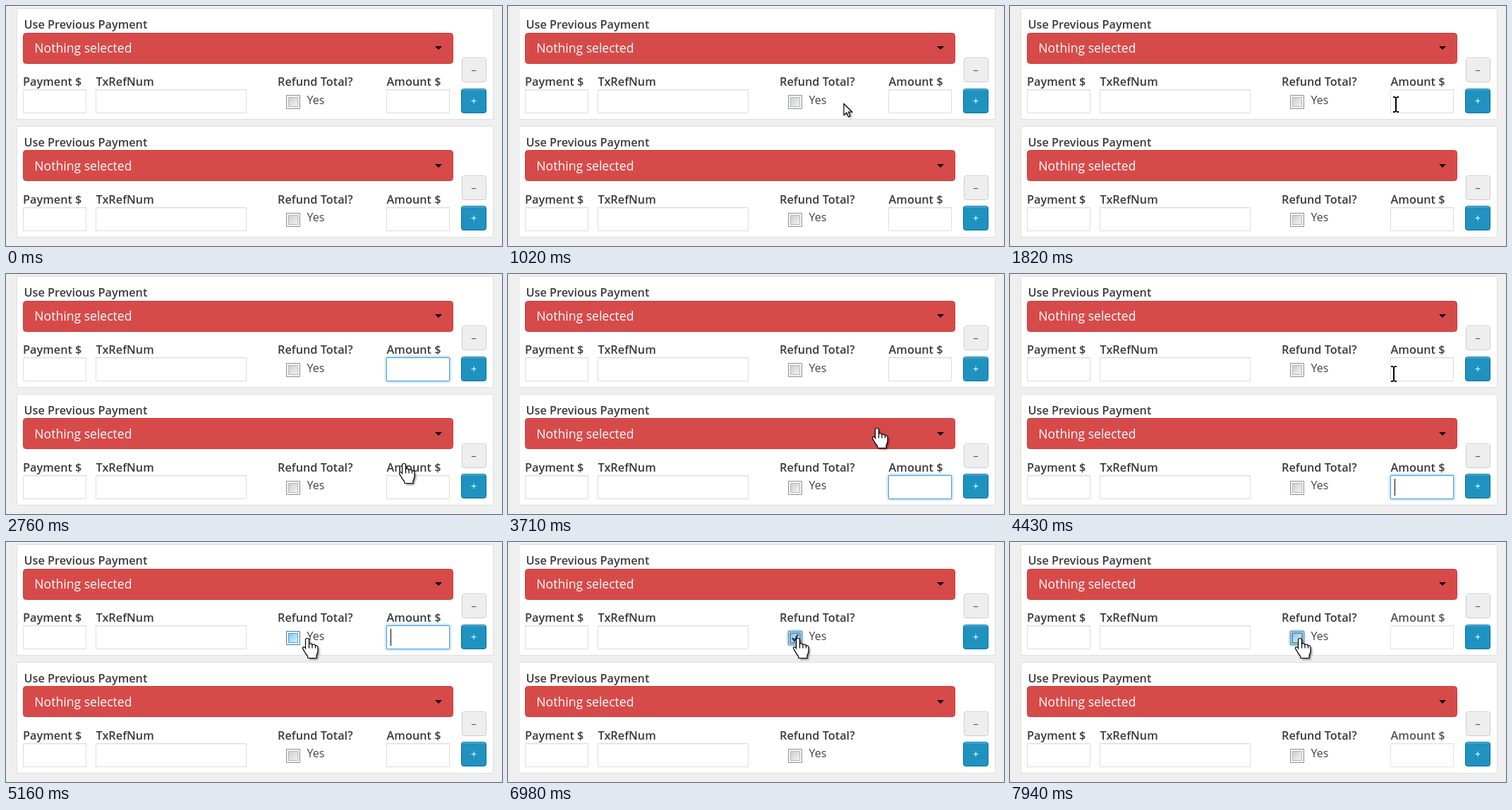
Animation of 703 by 340 pixels, one loop 8000 ms. Source, as an HTML page with a canvas:

```html
<!DOCTYPE html>
<html lang="en">
<head>
<meta charset="utf-8">
<title>Refund form</title>
<style>
html, body { margin: 0; width: 100%; height: 100%; overflow: hidden; background: #efefef; }
canvas { display: block; width: 703px; height: 340px; }
</style>
</head>
<body>
<canvas id="stage"></canvas>
<script>
const W = 703, H = 340, LOOP = 8000, TICK = 60, BLINK = 530, ROW = 167;
const canvas = document.getElementById('stage');
const ctx = canvas.getContext('2d');
const ratio = window.devicePixelRatio || 1;
canvas.width = W * ratio;
canvas.height = H * ratio;

const FONT = '"Open Sans", "Noto Sans", sans-serif';
const LABEL = '600 16.3px ' + FONT;
const INK = '#3a3a3a';

// The pointer glides to each spot in turn, slowing down by the given power
const ENTER = { at: 600, x: 668, y: 146 };
const GLIDES = [
  { at: 600, end: 1440, x: 412, y: 137, power: 2 },
  { at: 1700, end: 1940, x: 560, y: 139, power: 3.5 },
  { at: 2280, end: 2880, x: 565, y: 302, power: 1 },
  { at: 3140, end: 3320, x: 552, y: 302, power: 2 },
  { at: 3590, end: 4430, x: 544, y: 141, power: 4.7, bow: -25 },
  { at: 4800, end: 5340, x: 412, y: 137, power: 2 },
  { at: 6920, end: 6980, x: 411, y: 137, power: 1 }
];

// Clicks on the amount fields alternate between the panels
const CLICKS = [2140, 3140, 4680];
// The checkbox is pressed and released twice
const CHECK = { press: 5740, release: 5800 };
const UNCHECK = { press: 7510, release: 7680 };

const clamp = v => Math.max(0, Math.min(1, v));
const during = (t, { press, release }) => t >= press && t < release;

function pointerAt(t) {
  if (t < ENTER.at) return null;
  let { x, y } = ENTER;
  for (const g of GLIDES) {
    if (t < g.at) break;
    const ticked = Math.floor((t - g.at) / TICK) * TICK;
    const e = 1 - (1 - clamp(ticked / (g.end - g.at))) ** g.power;
    x += (g.x - x) * e + (g.bow || 0) * Math.sin(Math.PI * e);
    y += (g.y - y) * e;
  }
  return { x: Math.round(x), y: Math.round(y) };
}

function amountAlpha(t) {
  return t < UNCHECK.release
    ? 1 - clamp((t - CHECK.release) / 120)
    : clamp((t - UNCHECK.release) / 300);
}

function focusAt(t) {
  const i = CLICKS.filter(c => t >= c).length - 1;
  return i < 0 || t >= CHECK.press ? null : { panel: i % 2, since: CLICKS[i] };
}

const inside = (p, x, y, w, h) => !!p && p.x >= x && p.x < x + w && p.y >= y && p.y < y + h;

function text(str, x, y, font, color, align = 'left') {
  ctx.font = font;
  ctx.fillStyle = color;
  ctx.textAlign = align;
  ctx.fillText(str, x, y);
}

function box(x, y, w, h, fill, stroke, r = 0) {
  ctx.beginPath();
  ctx.roundRect(x + 0.5, y + 0.5, w - 1, h - 1, r);
  ctx.fillStyle = fill;
  ctx.fill();
  ctx.strokeStyle = stroke;
  ctx.lineWidth = 1;
  ctx.stroke();
}

function glow(x, y, w, h) {
  ctx.save();
  ctx.shadowColor = 'rgba(50,175,220,0.9)';
  ctx.shadowBlur = 4 * ratio;
  ctx.fillStyle = '#fff';
  ctx.fillRect(x, y, w, h);
  ctx.restore();
}

function field(x, y, w, focused) {
  if (focused) glow(x, y, w, 34);
  box(x, y, w, 34, '#fff', focused ? '#5b9dd9' : '#ddd');
  ctx.fillStyle = 'rgba(0,0,0,0.05)';
  ctx.fillRect(x + 1, y + 1, w - 2, 1);
}

function button(x, y, sign, fill, edge, shine, color) {
  const w = 681 - x;
  box(x, y, w, 35, fill, edge, 3);
  ctx.fillStyle = shine;
  ctx.fillRect(x + 2, y + 1, w - 4, 1);
  text(sign, 663, y + 22.5, '15px ' + FONT, color, 'center');
}

function checkbox(x, y, { hover, focus, press, checked }) {
  if (focus) glow(x, y, 20, 20);
  const blue = hover || focus;
  box(x, y, 20, 20, '#f4f4f4', blue ? '#3c7fb1' : '#8e8f8f');
  const g = ctx.createLinearGradient(x + 3, y + 3, x + 17, y + 17);
  g.addColorStop(0, press ? '#5eb0e4' : blue ? '#7cc5f2' : '#c6cbd0');
  g.addColorStop(1, press ? '#b5e1f7' : blue ? '#dcf5fd' : '#f6f6f6');
  box(x + 3, y + 3, 14, 14, g, blue ? '#5b9fc8' : '#b4b9be');
  if (focus) {
    ctx.setLineDash([1, 1]);
    ctx.strokeStyle = '#000';
    ctx.strokeRect(x + 2.5, y + 2.5, 15, 15);
    ctx.setLineDash([]);
  }
  if (checked) {
    ctx.beginPath();
    ctx.moveTo(x + 6, y + 10);
    ctx.lineTo(x + 9, y + 14);
    ctx.lineTo(x + 14, y + 5);
    ctx.strokeStyle = '#1f3a77';
    ctx.lineWidth = 2.5;
    ctx.stroke();
  }
}

function panel(n, t, p) {
  const a = n * ROW, b = n * (ROW - 1);
  box(15, 3 + a, 676, 158, '#fff', '#dfdfdf');
  text('Use Previous Payment', 25.4, 32 + a, LABEL, INK);

  const hot = inside(p, 24, 38 + b, 610, 44);
  box(24, 38 + b, 610, 44, '#d64b4a', hot ? '#d0403d' : '#cc3a38', 4);
  text('Nothing selected', 40.3, 66 + a, '17.6px ' + FONT, '#fff');
  ctx.beginPath();
  ctx.moveTo(608, 57 + a);
  ctx.lineTo(618, 57 + a);
  ctx.lineTo(613, 62 + a);
  ctx.fillStyle = '#000';
  ctx.fill();

  text('Payment $', 24, 113 + a, LABEL, INK);
  text('TxRefNum', 127.5, 113 + a, LABEL, INK);
  text('Refund Total?', 385, 113 + a, LABEL, INK);
  field(24, 118 + a, 90, false);
  field(127, 118 + a, 214, false);

  const first = n === 0;
  checkbox(397, 126 + a, {
    hover: inside(p, 397, 126 + a, 56, 22),
    focus: first && t >= CHECK.press,
    press: first && (during(t, CHECK) || during(t, UNCHECK)),
    checked: first && t >= CHECK.release && t < UNCHECK.release
  });
  text('Yes', 426.5, 139 + b, '16px ' + FONT, '#444');

  const focus = focusAt(t);
  const focused = !!focus && focus.panel === n;
  ctx.globalAlpha = amountAlpha(t);
  text('Amount $', 539.6, 113 + a, LABEL, INK);
  field(539, 118 + a, 90, focused);
  if (focused && Math.floor((t - focus.since) / BLINK) % 2 === 0) {
    ctx.fillStyle = '#000';
    ctx.fillRect(545, 123 + a, 1, 24);
  }
  ctx.globalAlpha = 1;

  button(646, 73 + a, '–', '#eeeeee', '#cccccc', '#fafafa', '#555');
  const lit = inside(p, 645, 117 + b, 36, 35);
  button(645, 117 + b, '+', lit ? '#1a82b0' : '#1f92bf', '#0074a2', '#6cc0de', '#fff');
}

const HAND = new Path2D('M-2.5 2Q-2.5 0 0 0Q2.5 0 2.5 2V8Q3 7 5 7.3Q7 7.6 7 9Q8 8.3 9.5 8.6' +
  'Q11.5 9 11.5 10.5Q12 10 13.5 10.3Q15 10.8 15 13V18Q15 21 13 24V28H1L.5 25Q-2.5 22-4 18.5' +
  'Q-6 15.5-6.5 14Q-6.5 12-4.5 12.2Q-3.2 12.6-2.5 14Z');
const KNUCKLES = new Path2D('M2.5 8V14M7 9V14M11.5 10.5V14');
const ARROW = new Path2D('M0 0V16L4 12.5L6.5 18.5L9 17.5L6.5 11.5H11.5Z');

function shape(path, p) {
  ctx.save();
  ctx.translate(p.x, p.y - 0.5);
  ctx.save();
  ctx.shadowColor = 'rgba(0,0,0,0.5)';
  ctx.shadowBlur = 3 * ratio;
  ctx.shadowOffsetX = ctx.shadowOffsetY = 2 * ratio;
  ctx.fillStyle = '#fff';
  ctx.fill(path);
  ctx.restore();
  ctx.strokeStyle = '#000';
  ctx.lineWidth = 1.2;
  ctx.stroke(path);
  if (path === HAND) ctx.stroke(KNUCKLES);
  ctx.restore();
}

function beam({ x, y }) {
  ctx.fillStyle = '#000';
  ctx.fillRect(x - 1, y - 10, 2, 21);
  for (const end of [y - 11, y + 10]) {
    ctx.fillRect(x - 4, end, 3, 2);
    ctx.fillRect(x + 1, end, 3, 2);
  }
}

function pointer(p, t) {
  const over = (x, y, w, h) => inside(p, x, y, w, h) || inside(p, x, y + ROW, w, h);
  const onLink = over(24, 38, 610, 44) || over(645, 73, 36, 80) ||
    over(397, 126, 56, 22) || over(540, 96, 77, 22);
  if (amountAlpha(t) > 0 && over(539, 118, 90, 34)) beam(p);
  else shape(onLink ? HAND : ARROW, p);
}

function draw(t) {
  const p = pointerAt(t);
  ctx.setTransform(ratio, 0, 0, ratio, 0, 0);
  ctx.fillStyle = '#efefef';
  ctx.fillRect(0, 0, W, H);
  panel(0, t, p);
  panel(1, t, p);
  if (p) pointer(p, t);
}

const start = performance.now();
function loop() {
  draw((performance.now() - start) % LOOP);
  requestAnimationFrame(loop);
}
loop();
</script>
</body>
</html>
```
